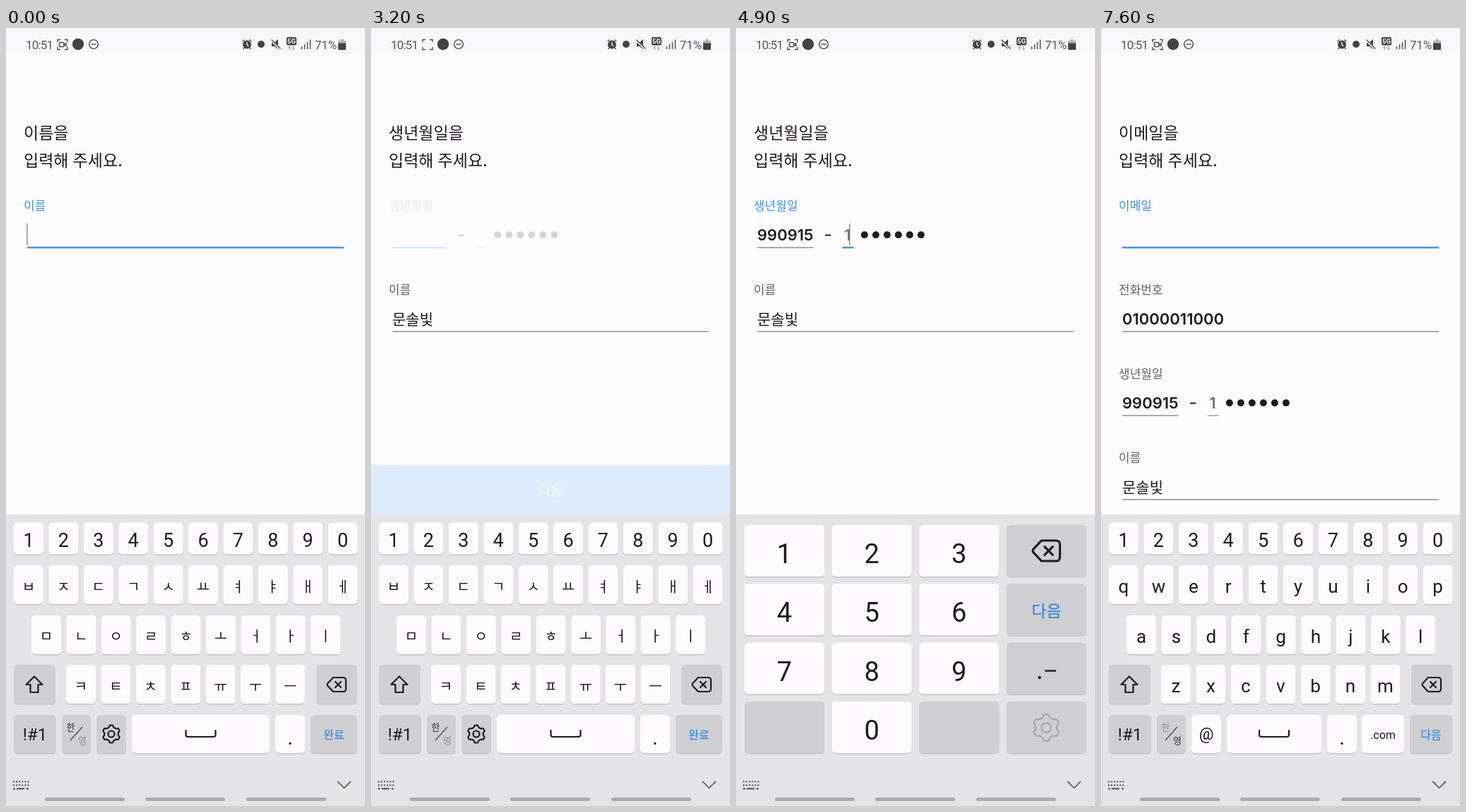
An HTML page that plays this animation: 508x1102 px, repeating every 8000 ms.

```html
<!DOCTYPE html>
<html lang="ko">
<head>
<meta charset="utf-8">
<title>Sign-up form</title>
<style>
html, body { margin: 0; width: 100%; height: 100%; overflow: hidden; background: #fefcff; }
svg { display: block; width: 100vw; height: 100vh; }
text { font-family: Inter, 'Noto Sans CJK KR', 'Noto Sans CJK JP', sans-serif; fill: #1c1b1f; white-space: pre; }
.title { font-size: 23px; font-weight: 500; }
.label { font-size: 17px; fill: #626168; }
.value { font-size: 22px; font-weight: 600; }
.ko { font-size: 21px; font-weight: 500; }
.kb text { font-family: Roboto, 'Noto Sans CJK KR', 'Noto Sans CJK JP', sans-serif; text-anchor: middle; }
.bar text { font-family: Roboto, sans-serif; fill: #58575a; }
.line { stroke: #8f8e94; stroke-width: 1.3; }
.active > .label { fill: #3994ec; }
.line.on { stroke: #3b96ee; stroke-width: 2.6; }
.ink { fill: none; stroke: #1c1b1f; stroke-width: 2.2; stroke-linejoin: round; stroke-linecap: round; }
.bar .thin { fill: none; stroke: #4c4b4e; stroke-width: 1.4; }
.bar .fill { fill: #434245; }
</style>
</head>
<body>
<svg id="stage" viewBox="0 0 508 1102" preserveAspectRatio="none">
  <rect width="508" height="1102" fill="#fefcff"/>
  <g class="bar">
    <rect width="508" height="35" fill="#f8f7f9"/>
    <text x="28" y="30" font-size="17" letter-spacing="-.8">10:51</text>
    <path class="thin" d="M73 20V16.500H77M83 16.500H87V20M87 27V30.500H83M77 30.500H73V27"/>
    <g id="cam">
      <rect class="thin" x="75.500" y="20.500" width="6.500" height="6" rx="1.200"/>
      <path class="thin" d="M82 23.500L85 21.500V25.500Z"/>
    </g>
    <circle class="fill" cx="102" cy="23" r="8.200"/>
    <circle class="thin" cx="124" cy="23" r="6.400"/>
    <path class="thin" d="M120.500 23H127.500"/>
    <circle class="fill" cx="341" cy="23.500" r="6"/>
    <path class="thin" stroke-width="2.400" d="M334.500 19L338 16.500M347.500 19L344 16.500M337 28L335.500 30M345 28L346.500 30"/>
    <path d="M341 20V24L343.500 25.500" fill="none" stroke="#f8f7f9" stroke-width="1.300"/>
    <circle class="fill" cx="361" cy="23" r="5"/>
    <path class="fill" d="M376 20.500H380L385 16V30L380 26H376Z"/>
    <path d="M375 17L388 30" stroke="#f8f7f9" stroke-width="3"/>
    <path class="thin" d="M375.500 16.500L388.500 29.500"/>
    <rect class="fill" x="397" y="13" width="14" height="11.500" rx="2"/>
    <text x="404" y="22.200" font-size="9.500" font-weight="700" text-anchor="middle" style="fill:#f8f7f9">5G</text>
    <path class="thin" style="stroke:#a9a8ab" d="M401.500 31V26.500L399.500 28.500M406.500 26V30.500L408.500 28.500"/>
    <path class="thin" stroke-width="2" d="M418.500 30V26M422.500 30V23M426.500 30V20M430.500 30V16.500"/>
    <text x="437" y="30" font-size="17" letter-spacing="-.2">71%</text>
    <path d="M473 16H478V18H481V30Q481 31 480 31H471Q470 31 470 30V18H473Z" fill="#b5b4b7"/>
    <path class="fill" d="M470 21.500H481V30Q481 31 480 31H471Q470 31 470 30Z"/>
  </g>

  <text class="title" id="title" x="25" y="157"></text>
  <text class="title" x="25" y="196">입력해 주세요.</text>

  <g class="field">
    <text class="label" x="25" y="258">이름</text>
    <text class="value ko" id="name" x="30" y="300.500"></text>
    <path id="compose" stroke="#1c1b1f" stroke-width="1.400"/>
    <path class="line" d="M30 311H478"/>
  </g>
  <g class="field">
    <text class="label" x="25" y="258">생년월일</text>
    <text class="value" id="birth" x="30" y="301"></text>
    <path class="line" id="birthLine"/>
    <g id="rest">
      <path d="M123.500 293.500H131.500" stroke="#1c1b1f" stroke-width="2"/>
      <text class="value" id="digit" x="155.500" y="301" text-anchor="middle" style="fill:#717077"></text>
      <path class="line" id="digitLine" d="M148 311H164"/>
      <g id="dots" fill="#1c1b1f"></g>
    </g>
  </g>
  <g class="field">
    <text class="label" x="25" y="258">전화번호</text>
    <text class="value" id="phone" x="30" y="301"></text>
    <path class="line" d="M30 311H478"/>
  </g>
  <g class="field">
    <text class="label" x="25" y="258">이메일</text>
    <path class="line" d="M30 311H478"/>
  </g>
  <rect id="cursor" y="276.500" width="1.200" height="31" fill="#77767b"/>

  <g id="next">
    <rect y="619" width="508" height="71" fill="#3e9bff"/>
    <text x="254" y="661.500" font-size="19" text-anchor="middle" style="fill:#fff">다음</text>
  </g>

  <rect y="689" width="508" height="413" fill="#e4e3e6"/>
  <g class="kb" id="kbKo"></g>
  <g class="kb" id="kbNum"></g>
  <g class="kb" id="kbEn"></g>
  <g id="dock">
    <path d="M469 1067L478.500 1076.500L488 1067" fill="none" stroke="#4c4b4e" stroke-width="1.500"/>
    <path d="M10 1067.500H33M10 1072.500H33" stroke="#4c4b4e" stroke-width="2" stroke-dasharray="2 2.100"/>
    <path d="M10 1077.500H13M15 1077.500H26M29 1077.500H32" stroke="#4c4b4e" stroke-width="2"/>
    <path d="M57.500 1092.500H165.500M199.500 1092.500H307.500M342.500 1092.500H450.500" stroke="#abaaad" stroke-width="5" stroke-linecap="round"/>
  </g>
</svg>
<script>
const LOOP = 8000, ROW = 119, WHITE = '#fdfbfe', GREY = '#cfced1', DOWN = '#a3a2a5', BLUE = '#1a7fec';
const $ = id => document.getElementById(id);
const fields = [...document.querySelectorAll('.field')];
const clamp = v => Math.max(0, Math.min(1, v));

function add(parent, tag, attrs, text) {
  const el = document.createElementNS('http://www.w3.org/2000/svg', tag);
  for (const k in attrs) el.setAttribute(k, attrs[k]);
  if (text) el.textContent = text;
  parent.appendChild(el);
  return el;
}

// ---- keyboards ----
const caps = {};

function key(kb, x, y, w, h, label, size, base, fill = WHITE, ink = '#1c1b1f') {
  add(kb, 'rect', { x, y: y + 1.5, width: w, height: h, rx: 5.5, fill: '#c6c5c9' });
  const cap = add(kb, 'rect', { x, y, width: w, height: h, rx: 5.5, fill });
  if (!label) return;
  add(kb, 'text', { x: x + w / 2, y: base, 'font-size': size, style: 'fill:' + ink }, label);
  caps[kb.id + label] = { cap, fill };
}

function gear(kb, cx, cy, R, stroke) {
  let d = '';
  for (let i = 0; i < 72; i++) {
    const a = i * Math.PI / 36;
    const r = R * (.89 + .11 * Math.tanh(-2.5 * Math.cos(6 * a)));
    d += (i ? 'L' : 'M') + (cx + r * Math.cos(a)).toFixed(2) + ' ' + (cy + r * Math.sin(a)).toFixed(2);
  }
  add(kb, 'path', { class: 'ink', d: d + 'Z', style: 'stroke:' + stroke });
  add(kb, 'circle', { class: 'ink', cx, cy, r: R * .36, style: 'stroke:' + stroke });
}

function backspace(kb, cx, cy, s) {
  add(kb, 'path', {
    class: 'ink', transform: `translate(${cx} ${cy}) scale(${s})`,
    d: 'M-5 -10H9Q13 -10 13 -6V6Q13 10 9 10H-5L-13 1.500Q-14 0 -13 -1.500ZM-2 -4L6 4M6 -4L-2 4'
  });
}

function letters(kb, rows, size, lift) {
  const row = (chars, x, y, h, fs, base) =>
    [...chars].forEach((c, i) => key(kb, x + i * 49.4, y, 42, h, c, fs, base));
  row('1234567890', 11, 700.5, 45, 27, 735);
  row(rows[0], 11, 761, 55, size, 800 - lift);
  row(rows[1], 36, 832, 55, size, 870.5 - lift);
  row(rows[2], 85, 902, 55, size, 941 - lift);
  key(kb, 11, 902, 59, 55, '', 0, 0, GREY);
  add(kb, 'path', { class: 'ink', d: 'M40 918.500L51.500 930H45.500V941H34.500V930H28.500Z' });
  key(kb, 439, 902, 58, 55, '', 0, 0, GREY);
  backspace(kb, 468, 930, 1);
  key(kb, 11, 973, 60, 54, '!#1', 24, 1008.5, GREY);
  key(kb, 79, 973, 41, 54, '', 0, 0, GREY);
}

function langs(kb, on, off) {
  add(kb, 'text', { x: 91.5, y: 995, 'font-size': 13, style: 'fill:' + on }, '한');
  add(kb, 'text', { x: 108, y: 1013.5, 'font-size': 13, style: 'fill:' + off }, '영');
  add(kb, 'path', { d: 'M91 1009L108 990', stroke: '#4c4b4e', 'stroke-width': 1.3 });
}

function space(kb, x, w) {
  key(kb, x, 973, w, 54, '');
  add(kb, 'path', { class: 'ink', d: `M${x + w / 2 - 21} 995V1001Q${x + w / 2 - 21} 1004 ${x + w / 2 - 18} 1004h36q3 0 3 -3V995` });
}

const ko = $('kbKo'), num = $('kbNum'), en = $('kbEn');

letters(ko, ['ㅂㅈㄷㄱㅅㅛㅕㅑㅐㅔ', 'ㅁㄴㅇㄹㅎㅗㅓㅏㅣ', 'ㅋㅌㅊㅍㅠㅜㅡ'], 20, 1.5);
langs(ko, '#2a292d', '#8d8c90');
key(ko, 128, 973, 42, 54, '', 0, 0, GREY);
gear(ko, 149, 1000, 12.5, '#1c1b1f');
space(ko, 178, 195);
key(ko, 381, 973, 42, 54, '.', 29, 1014.5);
key(ko, 431, 973, 66, 54, '완료', 16, 1006.5, GREY, BLUE);

letters(en, ['qwertyuiop', 'asdfghjkl', 'zxcvbnm'], 26, 0);
langs(en, '#8d8c90', '#2a292d');
key(en, 128, 973, 42, 54, '@', 23, 1008);
space(en, 178, 134);
key(en, 320, 973, 42, 54, '.', 29, 1014.5);
key(en, 369, 973, 60, 54, '.com', 16, 1007);
key(en, 437, 973, 60, 54, '다음', 16, 1006.5, GREY, BLUE);

const padX = c => 12 + c * 123.6, padY = r => 704 + r * 83.3;
const pad = (c, r, label, size, drop, fill, ink) =>
  key(num, padX(c), padY(r), 113, 73, label, size, padY(r) + drop, fill, ink);
for (let i = 0; i < 9; i++) pad(i % 3, Math.floor(i / 3), String(i + 1), 38, 54);
pad(0, 3, '', 0, 0, GREY);
pad(1, 3, '0', 38, 54);
pad(2, 3, '', 0, 0, GREY);
pad(3, 0, '', 0, 0, GREY);
backspace(num, 439.5, 740.5, 1.45);
pad(3, 1, '다음', 23, 47, GREY, BLUE);
pad(3, 2, '', 0, 0, GREY);
add(num, 'path', { d: 'M437 910.500H453', stroke: '#1c1b1f', 'stroke-width': 2.4 });
add(num, 'circle', { cx: 429.5, cy: 920, r: 2.2, fill: '#1c1b1f' });
pad(3, 3, '', 0, 0, GREY);
gear(num, 439, 991, 19, '#a6a5a9');

for (let i = 0; i < 6; i++) add($('dots'), 'circle', { cx: 179.3 + 16 * i, cy: 293, r: 5 });

// ---- schedule: [time of entry, key, text after it] ----
const grow = (chars, times) => times.map((t, i) => [t, chars[i], chars.slice(0, i + 1)]);
const typed = {
  name: [[900, 'ㅁ', 'ㅁ'], [1100, 'ㅜ', '무'], [1200, 'ㄴ', '문'],
         [1500, 'ㅅ', '문ㅅ'], [1600, 'ㅗ', '문소'], [1700, 'ㄹ', '문솔'],
         [2300, 'ㅂ', '문솔ㅂ'], [2500, 'ㅣ', '문솔비'], [2700, 'ㅊ', '문솔빛']],
  birth: grow('990915', [4000, 4100, 4200, 4400, 4500, 4700]),
  digit: grow('1', [4900]),
  phone: grow('01000011000', [5600, 6000, 6100, 6200, 6300, 6500, 6600, 6700, 6800, 6900, 7000])
};
const presses = Object.entries(typed).flatMap(([id, list]) =>
  list.map(([t, k]) => [t, caps[(id === 'name' ? 'kbKo' : 'kbNum') + k]]));
const starts = [-1000, 3100, 5000, 7100];
const titles = ['이름을', '생년월일을', '전화번호를', '이메일을'];
const edits = [0, 3400, 4700, 5000, 7100, ...presses.map(p => p[0])].sort((a, b) => a - b);

const show = (el, on) => el.setAttribute('visibility', on ? 'visible' : 'hidden');
const width = id => $(id).textContent ? $(id).getComputedTextLength() : 0;

function draw(t) {
  for (const id in typed) {
    const last = typed[id].filter(e => e[0] <= t).pop();
    const text = last ? last[2] : '';
    if ($(id).textContent !== text) $(id).textContent = text;
  }

  const step = starts.filter(s => s <= t).length - 1;
  const fade = clamp((t - starts[step] - 60) / 240);
  $('title').textContent = titles[step];
  fields.forEach((f, i) => {
    show(f, i <= step);
    f.setAttribute('transform', `translate(0 ${ROW * (step - i)})`);
    f.setAttribute('opacity', i === step ? fade : 1);
    f.classList.toggle('active', i === step);
    f.querySelector('.line').classList.toggle('on', i === step);
  });

  const second = step === 1 && t >= 4700;
  const extra = Math.max(0, width('birth') - 77);
  $('birthLine').setAttribute('d', `M30 311H${107 + extra}`);
  $('birthLine').classList.toggle('on', step === 1 && !second);
  $('digitLine').classList.toggle('on', second);
  $('rest').setAttribute('transform', `translate(${extra} 0)`);

  const w = width('name'), n = $('name').textContent.length;
  $('compose').setAttribute('d', n && t < 3000 ? `M${30 + w * (n - 1) / n} 303.500H${30 + w}` : '');

  const ends = [30 + w, second ? 149 + extra + width('digit') : 30 + width('birth'), 30 + width('phone'), 30];
  const since = t - edits.filter(e => e <= t).pop();
  $('cursor').setAttribute('x', ends[step] - .6);
  $('cursor').setAttribute('opacity', fade);
  show($('cursor'), since % 1000 < 500 && !(t >= 3100 && t < 3400));

  $('next').setAttribute('opacity', t < 3000 ? clamp((t - 850) / 300) : 1 - clamp((t - 3080) / 145));

  show(ko, t < 3500);
  show(num, t >= 3500 && t < 7400);
  show(en, t >= 7400);
  presses.forEach(([, k]) => k.cap.setAttribute('fill', k.fill));
  presses.forEach(([at, k]) => { if (t >= at - 100 && t < at - 20) k.cap.setAttribute('fill', DOWN); });

  show($('cam'), Math.abs(Math.floor((t - 100) / 500) % 2) === 1);
}

const begin = performance.now();
function tick() {
  draw((performance.now() - begin) % LOOP);
  requestAnimationFrame(tick);
}
tick();
</script>
</body>
</html>
```
